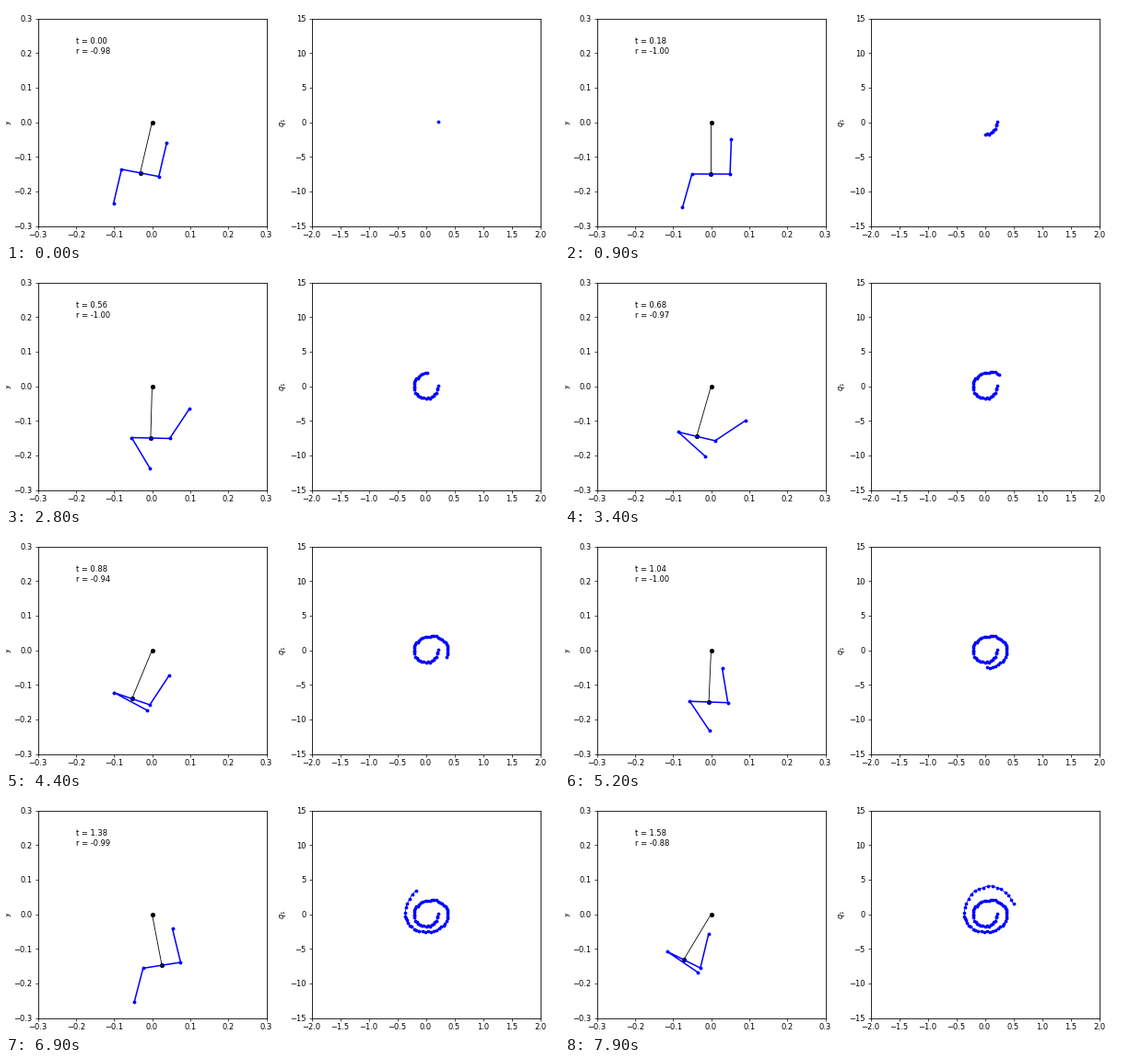
Write a matplotlib script that moves like this. It is 600x257 px and loops after 8 s.

```python
import numpy as np
import matplotlib.pyplot as plt
from matplotlib.animation import FuncAnimation

W, H, DPI = 600, 257, 100
FRAMES, INTERVAL, DT = 80, 100, 0.02
ROD, HALF, LEG = 0.15, 0.05, 0.1

plt.rcParams.update({
    "font.family": "DejaVu Sans", "font.size": 6,
    "axes.linewidth": 0.6,
    "xtick.major.width": 0.5, "ytick.major.width": 0.5,
    "xtick.major.size": 2.1, "ytick.major.size": 2.1,
    "xtick.major.pad": 2.1, "ytick.major.pad": 2.1,
})


def swing(t, *turns):
    """Angle and speed of a cosine swing between (time, angle) turning points."""
    x, y = np.array(turns).T
    i = np.clip(np.searchsorted(x, t, side="right") - 1, 0, len(x) - 2)
    span = x[i + 1] - x[i]
    amp = (y[i + 1] - y[i]) / 2
    phase = np.pi * (t - x[i]) / span
    return y[i] + amp * (1 - np.cos(phase)), amp * np.pi / span * np.sin(phase)


times = np.arange(FRAMES) * DT
q, qd = swing(times, (0, .21), (.36, -.207), (.825, .387), (1.275, -.36), (1.62, .53))
left, _ = swing(times, (0, .21), (.14, .26), (.9, -1.04), (1.23, .25),
                (1.36, .25), (1.62, -1))
right, _ = swing(times, (0, .21), (.3, -.06), (.38, -.06), (.7, .95),
                 (1.2, -.48), (1.64, .25))
noisy_qd = qd + np.random.default_rng(4).uniform(-.1, .1, FRAMES)

fig = plt.figure(figsize=(W / DPI, H / DPI), dpi=DPI, facecolor="white")


def panel(x, xlim, ylim, xticks, yticks):
    ax = fig.add_axes([(x - .5) / W, 17.5 / H, 248 / W, 226 / H])
    ax.set(xlim=xlim, ylim=ylim, xticks=xticks, yticks=yticks)
    return ax


def side_label(x, text):
    fig.text(x / W, .507, text, rotation=90, ha="center", va="center")


tenths = np.linspace(-.3, .3, 7).round(1)
arm = panel(35, (-.3, .3), (-.3, .3), tenths, tenths)
phase = panel(332, (-2, 2), (-15, 15), np.arange(-2, 2.1, .5), range(-15, 16, 5))
side_label(.8, "y")
side_label(301, "$q_1$")

rod, = arm.plot([], [], "ko-", lw=.6, ms=3.2, mew=.5)
body, = arm.plot([], [], "b.-", lw=1.1, ms=3.6)
trace, = phase.plot([], [], "b.-", lw=.6, ms=3.4)
clock = arm.text(-.2, .2265, "")
height = arm.text(-.2, .1975, "")


def toward(angle, length):
    """Vector of the given length, measured from straight down."""
    return -length * np.array([np.sin(angle), np.cos(angle)])


def update(k):
    bob = toward(q[k], ROD)
    bar = toward(q[k] - np.pi / 2, HALF)
    joints = [bob - bar + toward(left[k], LEG), bob - bar,
              bob + bar, bob + bar - toward(right[k], LEG)]
    rod.set_data([0, bob[0]], [0, bob[1]])
    body.set_data(*np.transpose(joints))
    trace.set_data(q[:k + 1], noisy_qd[:k + 1])
    clock.set_text(f"t = {times[k]:.2f}")
    height.set_text(f"r = {-np.cos(q[k]):.2f}")
    return rod, body, trace, clock, height


anim = FuncAnimation(fig, update, frames=FRAMES, interval=INTERVAL,
                     repeat=True, repeat_delay=0, blit=False)
plt.show()
```
